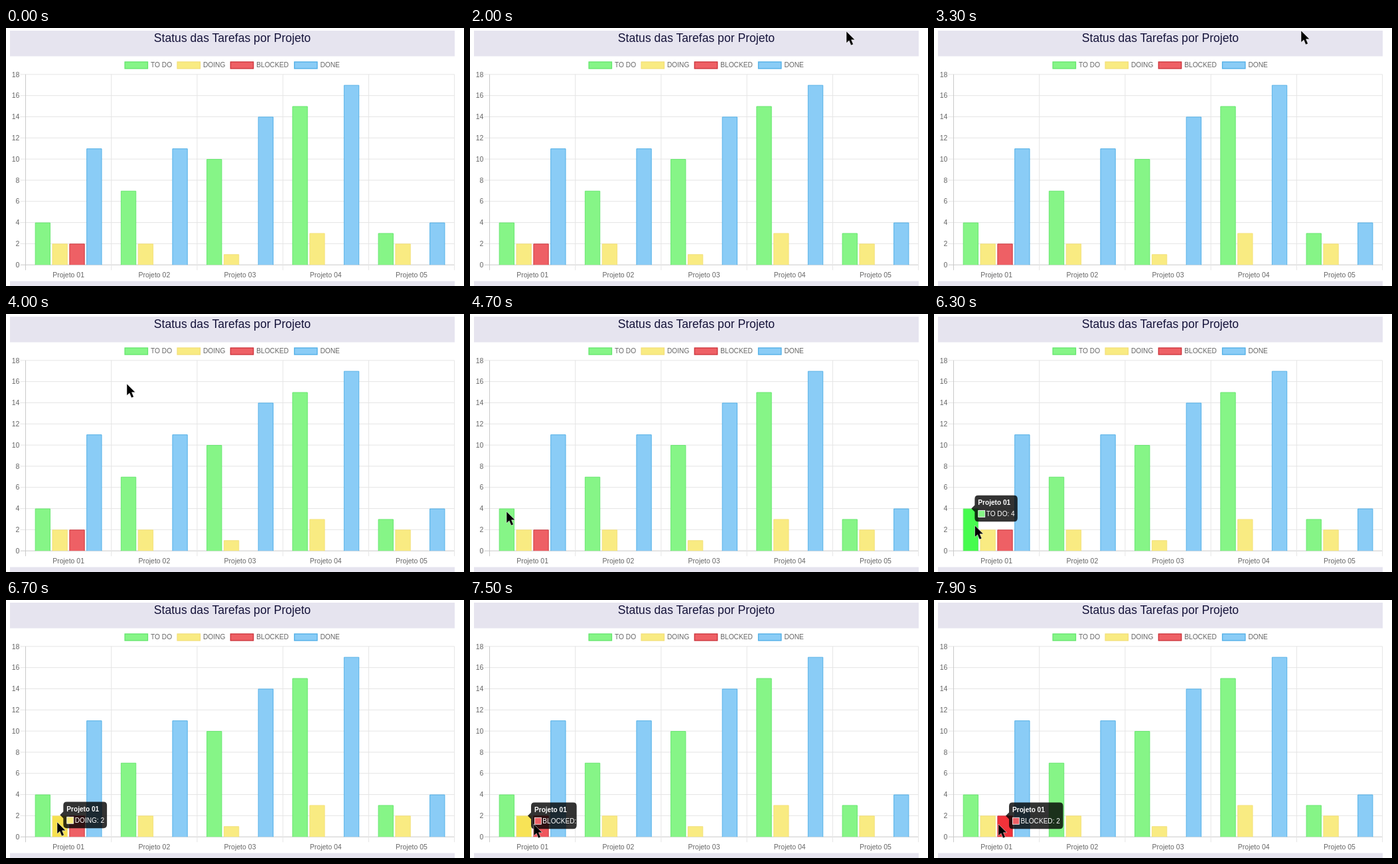
Animation of 690 by 388 pixels, one loop 8 s. Source, as an HTML page:

```html
<!DOCTYPE html>
<html lang="pt">
<head>
<meta charset="utf-8">
<title>Status das Tarefas</title>
<style>
  html, body { margin: 0; width: 100%; height: 100%; overflow: hidden; background: #fff; }
  svg { display: block; width: 690px; height: 388px; font-family: Arial, "Liberation Sans", sans-serif; }
</style>
</head>
<body>
<svg id="stage" viewBox="0 0 690 388"></svg>
<script>
const LOOP = 8000, TICK = 100, FADE = 400;
const LEFT = 29.5, RIGHT = 675.6, BASE = 356.2, UNIT = 15.91;
const TOP = BASE - 18 * UNIT, CAT = (RIGHT - LEFT) / 5;
const SLOT = CAT * 0.2, BAR = SLOT * 0.9;

const series = [
  { name: 'TO DO',   data: [4, 7, 10, 15, 3],    fill: [134, 245, 135], hover: [70, 252, 78],  line: '#62e56b', x: 178.6 },
  { name: 'DOING',   data: [2, 2, 1, 3, 2],      fill: [249, 235, 130], hover: [247, 225, 76], line: '#f3df78', x: 257.6 },
  { name: 'BLOCKED', data: [2, 0, 0, 0, 0],      fill: [238, 96, 101],  hover: [241, 50, 58],  line: '#cb3038', x: 337.8 },
  { name: 'DONE',    data: [11, 11, 14, 17, 4],  fill: [138, 204, 246], hover: [70, 170, 240], line: '#4cade6', x: 434 }
];

// Pointer path: time, x, y
const path = [
  [2000, 567, 5], [3200, 567, 5], [3300, 553, 4], [3400, 522, 4], [3500, 476, 14],
  [3600, 420, 30], [3700, 361, 49], [3800, 303, 67], [3900, 246, 84], [4000, 182, 105],
  [4100, 126, 141], [4200, 106, 172], [4300, 70, 230], [4400, 59, 272], [4500, 55, 293],
  [4700, 55, 297], [5000, 53, 299], [5200, 52, 301], [5950, 52, 301], [6200, 56, 311],
  [6400, 67, 325], [6500, 72, 330], [6700, 77, 334], [7350, 77, 334], [7500, 96, 337],
  [7600, 97, 337]
];

// Tooltips over the first three bars of the first project
const tips = [
  { at: 4720, w: 64.5, text: 'TO DO: 4' },
  { at: 6470, w: 65.8, text: 'DOING: 2' },
  { at: 7480, w: 81.5, text: 'BLOCKED: 2' }
];

const stage = document.getElementById('stage');

function add(parent, tag, attrs, text) {
  const el = document.createElementNS('http://www.w3.org/2000/svg', tag);
  set(el, attrs);
  if (text) el.textContent = text;
  parent.appendChild(el);
  return el;
}
function set(el, attrs) {
  for (const k in attrs) el.setAttribute(k, attrs[k]);
}
const rect = (x, y, width, height, fill, more) => add(stage, 'rect', { x, y, width, height, fill, ...more });
const label = (x, y, text, size, anchor = 'start', fill = '#666') =>
  add(stage, 'text', { x, y, 'font-size': size, 'text-anchor': anchor, fill }, text);
const line = (x1, y1, x2, y2, stroke) => add(stage, 'line', { x1, y1, x2, y2, stroke, 'stroke-width': 1 });
const rgb = c => `rgb(${c.map(Math.round)})`;
const mix = (a, b, k) => a + (b - a) * k;
const mixColor = (a, b, k) => rgb(a.map((v, i) => mix(v, b[i], k)));
const outQuart = k => 1 - Math.pow(1 - k, 4);
const barX = (cat, s) => LEFT + cat * CAT + CAT * 0.1 + s * SLOT + (SLOT - BAR) / 2;
const barY = v => BASE - v * UNIT;

// Page and title
rect(0, 0, 690, 388, '#fff');
rect(6, 4, 670, 38.5, '#e6e4ef');
rect(6, 380.6, 670, 8, '#e6e4ef');
label(341, 21, 'Status das Tarefas por Projeto', 17.6, 'middle', '#15133a');

// Legend
for (const s of series) {
  rect(s.x + 0.5, 51, 34.4, 10, rgb(s.fill), { stroke: s.line, 'stroke-width': 1.3 });
  label(s.x + 39.4, 59.4, s.name, 10.2);
}

// Grid and axes
for (let v = 0; v <= 18; v += 2) {
  const y = barY(v);
  line(21.5, y, RIGHT, y, v ? '#e5e5e5' : '#cacaca');
  label(20.4, y + 3.7, String(v), 10.5, 'end');
}
for (let c = 0; c <= 5; c++) {
  const x = LEFT + c * CAT;
  line(x, TOP, x, BASE + 8, c ? '#e5e5e5' : '#cacaca');
  if (c < 5) label(x + CAT / 2, 375, 'Projeto 0' + (c + 1), 10.5, 'middle');
}

// Bars
const first = [];
series.forEach((s, i) => s.data.forEach((v, c) => {
  if (!v) return;
  const x = barX(c, i) + 0.45, w = BAR - 0.9;
  const bar = add(stage, 'path', {
    d: `M${x} ${BASE}V${barY(v) + 0.45}h${w}V${BASE}`,
    fill: rgb(s.fill), stroke: s.line, 'stroke-width': 0.9
  });
  if (c === 0) first[i] = bar;
}));

// Tooltip
const tip = add(stage, 'g', {});
const back = add(tip, 'path', { fill: '#000', 'fill-opacity': 0.8 });
add(tip, 'text', { x: 10, y: -5.4, 'font-size': 10.1, 'font-weight': 'bold', fill: '#fff' }, 'Projeto 01');
const swatch = add(tip, 'rect', { x: 10.4, y: 2.9, width: 10, height: 10, stroke: '#fff', 'stroke-width': 0.8 });
const body = add(tip, 'text', { x: 22.4, y: 11.6, 'font-size': 10.1, fill: '#fff' });

const pointer = add(stage, 'path', {
  d: 'M0 0V17.6L4.1 13.9L7 21L10.4 19.6L7.5 12.8H12.8Z',
  fill: '#000', stroke: '#fff', 'stroke-width': 0.5
});

// Box with its caret tip at 0,0
const bubble = w => `M0 0L5 -5V-14.5Q5 -19.8 10.3 -19.8H${w - 0.3}Q${w + 5} -19.8 ${w + 5} -14.5` +
  `V14.5Q${w + 5} 19.8 ${w - 0.3} 19.8H10.3Q5 19.8 5 14.5V5Z`;

function pointAt(t) {
  let i = 0;
  while (i < path.length - 1 && path[i + 1][0] <= t) i++;
  const a = path[i], b = path[i + 1] || a;
  const k = b === a ? 0 : (t - a[0]) / (b[0] - a[0]);
  return [mix(a[1], b[1], k), mix(a[2], b[2], k)];
}

function draw(t) {
  pointer.setAttribute('visibility', t < path[0][0] ? 'hidden' : 'visible');
  if (t >= path[0][0]) pointer.setAttribute('transform', `translate(${pointAt(t)})`);

  let now = -1;
  tips.forEach((p, i) => { if (t >= p.at) now = i; });
  const k = now < 0 ? 0 : outQuart(Math.min(1, (t - tips[now].at) / FADE));

  tips.forEach((p, i) => {
    const heat = i === now ? k : i === now - 1 ? 1 - k : 0;
    first[i].setAttribute('fill', mixColor(series[i].fill, series[i].hover, heat));
  });

  tip.setAttribute('opacity', now < 0 ? 0 : now ? 1 : k);
  if (now < 0) return;
  const from = Math.max(0, now - 1);
  const cx = i => barX(0, i) + BAR / 2 + 1;
  const cy = i => barY(series[i].data[0]);
  tip.setAttribute('transform', `translate(${mix(cx(from), cx(now), k)},${mix(cy(from), cy(now), k)})`);
  back.setAttribute('d', bubble(mix(tips[from].w, tips[now].w, k)));
  swatch.setAttribute('fill', rgb(series[now].fill));
  body.textContent = tips[now].text;
}

const start = performance.now();
function frame() {
  const t = (performance.now() - start) % LOOP;
  draw(Math.floor(t / TICK) * TICK);
  requestAnimationFrame(frame);
}
frame();
</script>
</body>
</html>
```
